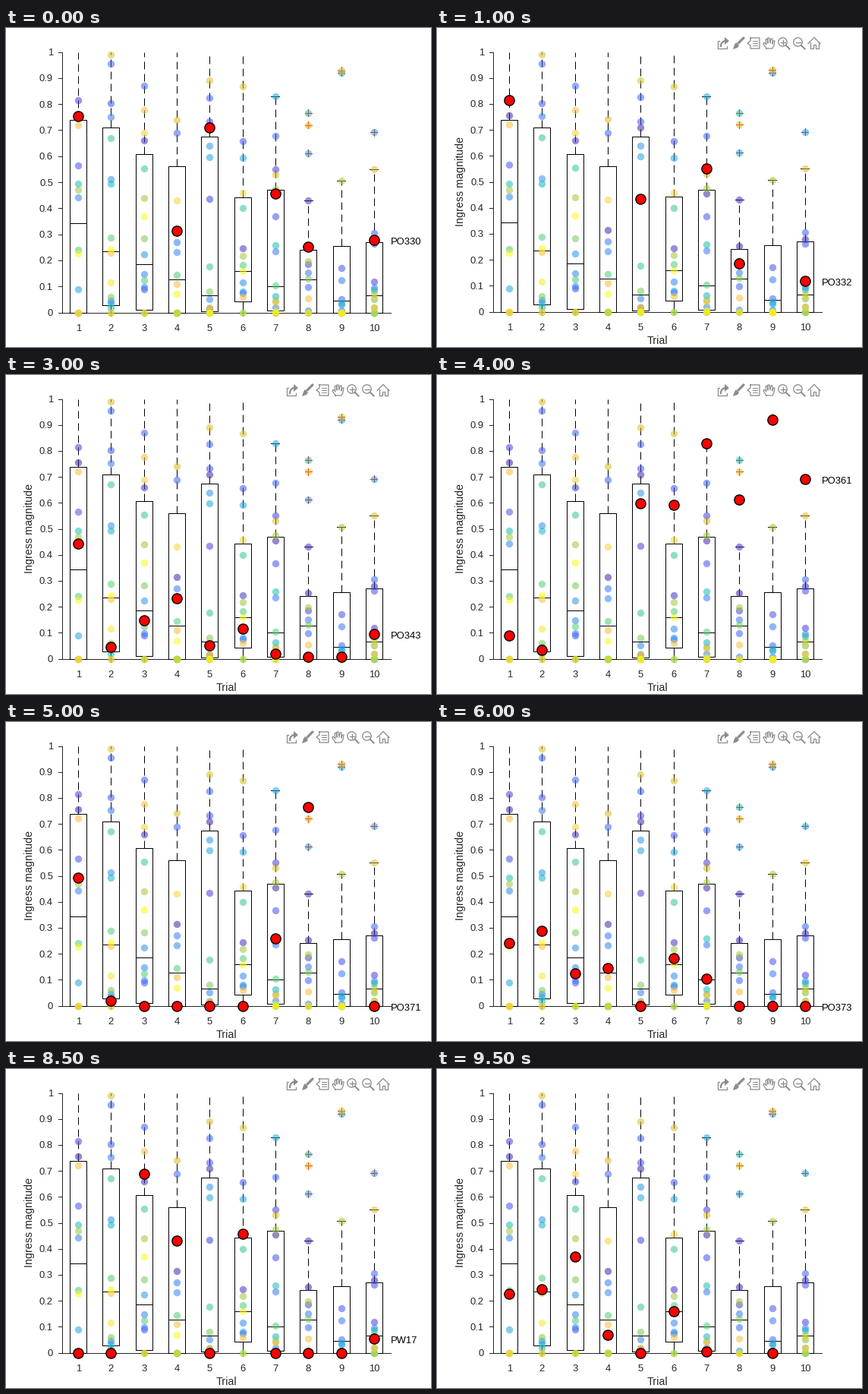
Animation of 560 by 420 pixels, one loop 10 s. Source, as a matplotlib script:

```python
import numpy as np
import matplotlib.pyplot as plt
from matplotlib.animation import FuncAnimation
from matplotlib.colors import LinearSegmentedColormap
from matplotlib.patches import Circle, Polygon

W, H, DPI = 560, 420, 100
PT = 72 / DPI
TOP, LEFT, RIGHT = 31.5, 73.5, 506.5
INK, GRAY = "#262626", "#8c8c8c"
NO = np.nan

parula = LinearSegmentedColormap.from_list("parula", [
    (0, (.242, .150, .660)), (.12, (.278, .270, .900)),
    (.25, (.222, .455, .990)), (.375, (.154, .590, .922)),
    (.5, (.070, .735, .740)), (.625, (.290, .800, .480)),
    (.73, (.600, .785, .230)), (.79, (.850, .742, .160)),
    (.85, (.990, .740, .230)), (.92, (.970, .860, .190)),
    (1, (.977, .984, .080))])

subjects = []


def subject(label, *values):
    subjects.append((label, np.array(values)))


# One magnitude per trial; NO marks a missed trial.
subject("PO330", .755, NO, NO, .313, .710, NO, .455, .253, NO, .278)
subject("PO331", NO, NO, .660, NO, NO, .245, NO, .430, NO, NO)
subject("PO332", .815, NO, NO, NO, .435, NO, .550, .185, NO, .117)
subject("PO340", .565, .803, .088, NO, .733, .657, .368, NO, .172, .263)
subject("PO341", 0, .955, .870, .690, .825, NO, .677, .097, .050, .305)
subject("PO342", NO, .752, .097, .270, .015, .075, .235, .152, .125, 0)
subject("PO343", .443, .045, .148, .233, .050, .115, .020, .008, .008, .095)
subject("PO350", NO, .513, .224, NO, .640, .080, NO, NO, .030, NO)
subject("PO361", .088, .035, NO, NO, .597, .593, .830, .612, .920, .692)
subject("PO370", NO, .493, NO, 0, NO, NO, .063, NO, .037, .085)
subject("PO371", .493, .020, 0, 0, 0, 0, .258, .766, NO, 0)
subject("PO372", NO, .670, .553, 0, .177, .400, 0, NO, 0, .050)
subject("PO373", .240, .287, .123, .145, 0, .182, .103, 0, 0, 0)
subject("PW13", NO, .060, .283, 0, .080, NO, .045, .130, 0, .020)
subject("PW14", .470, 0, .440, 0, .010, .218, .475, .197, .507, .070)
subject("PW15", 0, .990, 0, .740, .890, .868, .530, .720, .930, .550)
subject("PW16", .720, .230, .777, .110, .020, .060, .040, .055, 0, .020)
subject("PW17", 0, 0, .690, .430, 0, .458, 0, 0, 0, .053)
subject("PW18", 0, .115, 0, 0, 0, 0, 0, 0, 0, 0)
subject("PW19", .226, .243, .370, .070, 0, .160, .005, NO, 0, NO)

# Lower quartile, median, upper quartile, upper whisker.
boxes = [(0, .343, .738, 1), (.028, .235, .710, 1), (.010, .186, .607, 1),
         (0, .127, .560, 1), (.005, .067, .675, 1), (.043, .158, .442, 1),
         (.008, .102, .470, .83), (0, .128, .240, .43),
         (0, .045, .255, .507), (0, .067, .270, .55)]
outliers = [(8, .766), (8, .72), (8, .612), (9, .93), (9, .92), (10, .692)]

fig = plt.figure(figsize=(W / DPI, H / DPI), dpi=DPI, facecolor="white")
ax = fig.add_axes([0, 0, 1, 1])


def trial_x(trial):
    return LEFT + (trial - .5) * (RIGHT - LEFT) / 10


def line(xs, ys, color="black", width=1, **kw):
    ax.plot(xs, ys, color=color, lw=width * PT, **kw)


def dots(xs, ys, size, **kw):
    ax.plot(xs, ys, "o", ms=size * PT, **kw)


def text(x, y, s, size=13, color=INK, **kw):
    kw.setdefault("va", "baseline")
    ax.text(x, y, s, fontsize=size * PT, color=color,
            family="Liberation Sans", **kw)


def icon_line(points, width=1.3, **kw):
    xs, ys = zip(*points)
    line(xs, ys, GRAY, width, **kw)


def icon_fill(points):
    ax.add_patch(Polygon(points, fc=GRAY, ec="none"))


def draw_toolbar():
    # export
    icon_line([(372, 17), (370, 17), (370, 27), (382, 27), (382, 24)])
    t = np.linspace(0, np.pi / 2, 12)
    icon_line(list(zip(380 - 6 * np.cos(t), 24 - 7 * np.sin(t))), 2.2)
    icon_fill([(379, 12), (385, 17), (379, 22)])
    # brush
    icon_line([(404, 13), (397, 20)], 3.2, solid_capstyle="round")
    icon_fill([(394, 19), (398, 23), (396, 26), (390, 28), (392, 22)])
    # data tip
    icon_line([(413, 13), (425, 13), (425, 27), (413, 27), (413, 23),
               (409, 20), (413, 17), (413, 13)])
    for y in (17, 20, 23):
        icon_line([(416, y), (422, y)], 1)
    # pan hand
    icon_line([(434, 27), (430, 21), (431, 19), (434, 22), (433, 15),
               (435, 14), (436, 20), (436, 13), (438, 13), (439, 20),
               (440, 14), (442, 14), (442, 21), (443, 17), (445, 17),
               (444, 23), (442, 27), (434, 27)], 1.2)
    # zoom in and out
    for x in (455.5, 475.5):
        ax.add_patch(Circle((x, 18.5), 5.7, fc="none", ec=GRAY, lw=1.3 * PT))
        icon_line([(x + 4.3, 22.8), (x + 9, 27.5)], 2)
        icon_line([(x - 3, 18.5), (x + 3, 18.5)])
    icon_line([(455.5, 15.5), (455.5, 21.5)])
    # home
    icon_line([(489, 20.5), (497, 12.5), (505, 20.5)])
    icon_line([(491.5, 19), (491.5, 27), (495.5, 27), (495.5, 22),
               (498.5, 22), (498.5, 27), (502.5, 27), (502.5, 19)])


def draw_axes(bottom, y_of):
    line([LEFT, LEFT], [TOP, bottom], INK)
    line([LEFT, RIGHT], [bottom, bottom], INK)
    for k in range(11):
        y = y_of(k / 10)
        line([LEFT - 4.5, LEFT], [y, y], INK)
        text(62, y + 4.5, f"{k / 10:g}", ha="right")
    for trial in range(1, 11):
        x = trial_x(trial)
        line([x, x], [bottom, bottom + 4.5], INK)
        text(x, bottom + 24.5, str(trial), ha="center")


def draw_boxes(y_of):
    for trial, (q1, median, q3, high) in enumerate(boxes, 1):
        x = trial_x(trial)
        l, r = x - 11, x + 11
        y1, ym, y3, yh, y0 = map(y_of, (q1, median, q3, high, 0))
        line([l, r, r, l, l], [y1, y1, y3, y3, y1])
        line([l, r], [ym, ym])
        line([x, x], [y3, yh], dashes=(10, 6), dash_capstyle="butt")
        if q1 > 0:
            line([x, x], [y1, y0])
        line([x - 5.5, x + 5.5], [y0, y0])
        if high < 1:
            line([x - 5.5, x + 5.5], [yh, yh])
    for trial, value in outliers:
        x, y = trial_x(trial), y_of(value)
        line([x - 4.5, x + 4.5], [y, y], "red")
        line([x, x], [y - 4.5, y + 4.5], "red")


def update(frame):
    ax.clear()
    ax.set(xlim=(0, W), ylim=(H, 0))
    ax.axis("off")
    first = frame == 0
    bottom = 374.5 if first else 373.5

    def y_of(value):
        return bottom - value * (bottom - TOP)

    draw_axes(bottom, y_of)
    if not first:
        text(290, 416, "Trial", 14.3, ha="center")
        text(31, 202, "Ingress magnitude", 14.3, ha="center", va="center",
             rotation=90)
        draw_toolbar()
    draw_boxes(y_of)

    xs = trial_x(np.arange(1, 11))
    for k, (_, values) in enumerate(subjects):
        dots(xs, y_of(values), 9.4, mfc=parula(k / (len(subjects) - 1)),
             mec="none", alpha=.55)

    label, values = subjects[frame]
    dots(xs, y_of(values), 13.2, mfc="red", mec="black", mew=1.4 * PT)
    if np.isfinite(values[-1]):
        text(507, y_of(values[-1]) + 6, label, color="black")
    return []


anim = FuncAnimation(fig, update, frames=len(subjects), interval=500,
                     init_func=lambda: [], repeat=True, repeat_delay=0)
plt.show()
```
